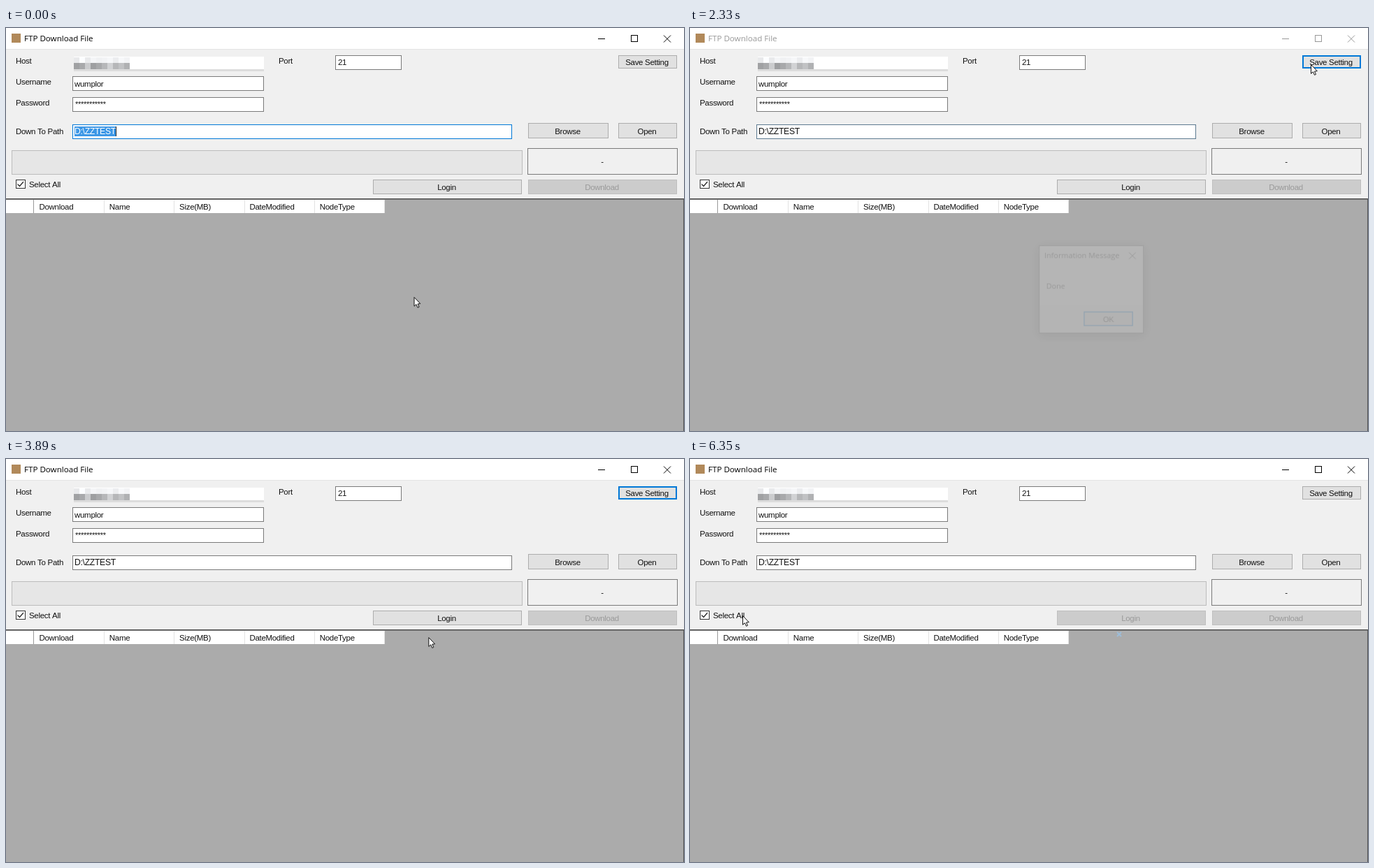
Write an HTML page with a canvas that moves like this. It is 970 px wide and 577 px high and loops after 8000 ms.

```html
<!DOCTYPE html>
<html lang="en">
<head>
<meta charset="utf-8">
<title>FTP Download File</title>
<style>
html, body { margin: 0; width: 100%; height: 100%; overflow: hidden; background: #ababab; }
canvas { display: block; }
</style>
</head>
<body>
<canvas id="stage" width="970" height="577"></canvas>
<script>
const stage = document.getElementById('stage').getContext('2d');
const layer = document.createElement('canvas').getContext('2d');
layer.canvas.width = 970;
layer.canvas.height = 577;
let ctx = stage;

const LOOP = 8000;
const SANS = '"Liberation Sans", Arial, sans-serif';
const UI = '"Open Sans", "Noto Sans", sans-serif';
const BLUE = '#0078d7';
const EDGE = '#7a7a7a';

// Pointer moves between rests
const START = { x: 583.5, y: 385 };
const MOVES = [
  { from: 780, to: 1220, x: 756, y: 95 },
  { from: 1350, to: 1550, x: 757, y: 82 },
  { from: 1650, to: 1990, x: 888, y: 52 },
  { from: 2390, to: 3200, x: 583.5, y: 412 },
  { from: 3690, to: 4080, x: 607, y: 235 },
  { from: 4800, to: 5400, x: 146, y: 234 },
  { from: 5740, to: 6350, x: 75, y: 224 }
];
const SAVE_CLICK = 2040, OK_CLICK = 3330, LOGIN_CLICK = 4160;

const ramp = (t, a, b) => Math.max(0, Math.min(1, (t - a) / (b - a)));
const within = (t, a, b) => t >= a && t < b;
const easeOut = k => 1 - (1 - k) ** 3;
const mix = (a, b, k) => a + (b - a) * k;

function pointerAt(t) {
  return MOVES.reduce((p, m) => {
    const k = easeOut(ramp(t, m.from, m.to));
    return { x: mix(p.x, m.x, k), y: mix(p.y, m.y, k) };
  }, START);
}

function fill(x, y, w, h, color) {
  ctx.fillStyle = color;
  ctx.fillRect(x, y, w, h);
}

// Filled box with its border drawn inside
function box(x, y, w, h, color, border, line = 1) {
  fill(x, y, w, h, color);
  ctx.strokeStyle = border;
  ctx.lineWidth = line;
  ctx.strokeRect(x + line / 2, y + line / 2, w - line, h - line);
}

function text(str, x, y, { color = '#111', size = 11.5, font = SANS, align = 'left' } = {}) {
  ctx.font = `${size}px ${font}`;
  ctx.letterSpacing = font === SANS ? '-0.3px' : '0px';
  ctx.textAlign = align;
  ctx.fillStyle = color;
  ctx.fillText(str, x, y);
}

function stroke(points, color, line = 1) {
  ctx.beginPath();
  points.forEach(([x, y]) => ctx.lineTo(x, y));
  ctx.strokeStyle = color;
  ctx.lineWidth = line;
  ctx.stroke();
}

function cross(x, y, size, color, line) {
  stroke([[x, y], [x + size, y + size]], color, line);
  stroke([[x + size, y], [x, y + size]], color, line);
}

const STATES = {
  normal: ['#e1e1e1', '#adadad', 1],
  focus: ['#e1e1e1', BLUE, 2],
  hover: ['#e5f1fb', BLUE, 1],
  pressed: ['#cce4f7', '#005499', 1],
  off: ['#cccccc', '#bfbfbf', 1]
};

function button(label, x, y, w, h, state = 'normal') {
  box(x, y, w, h, ...STATES[state]);
  text(label, x + w / 2 - 1, y + h / 2 + 4.5, { align: 'center', color: state === 'off' ? '#9a9a9a' : '#111' });
}

function titleBar(active) {
  const color = active ? '#000' : '#999';
  fill(0, 0, 970, 30, '#fff');
  fill(0, 30, 970, 1, '#e4e4e4');
  fill(8, 8, 13, 13, '#b1895a');
  text('FTP Download File', 26, 19, { color, size: 11.6, font: UI });
  stroke([[847, 15.5], [857, 15.5]], color);
  ctx.strokeRect(894.5, 10.5, 9, 9);
  cross(941, 10.5, 10, color);
}

// Blurred-out host: white field, soft lower edge, two rows of grey blocks
function hiddenHost() {
  fill(97, 41, 272, 18, '#fff');
  fill(97, 59, 272, 3, '#dcdcdc');
  for (let i = 0; i < 20; i++) {
    const noise = Math.abs(Math.sin(i * 12.9898) * 43758.5453) % 1;
    const v = i < 10 ? 232 + 22 * noise : 158 + 55 * noise;
    fill(97 + i % 10 * 8, i < 10 ? 42 : 50, 8, 9, `rgb(${v},${v + 1},${v + 3})`);
  }
}

function pathField(t) {
  const focused = t < SAVE_CLICK;
  const k = ramp(t, SAVE_CLICK, 2420);
  const border = `rgb(${122 * k},${mix(120, 122, k)},${mix(215, 122, k)})`;
  box(95, 138, 629, 21, '#fff', border);
  if (focused) fill(98, 141, 60, 14, '#3c97e6');
  text('D:\\ZZTEST', 98, 152, { size: 12.2, color: focused ? '#fff' : '#111' });
  const caretOn = (t + 50) % 1060 < 530;
  if (focused && caretOn) fill(157, 141, 1, 14, '#222');
}

function saveState(t) {
  if (t < 1930 || t >= LOGIN_CLICK) return 'normal';
  if (t < SAVE_CLICK) return 'hover';
  return t < 2200 ? 'pressed' : 'focus';
}

function loginState(t) {
  if (t < 4040) return 'normal';
  if (t < LOGIN_CLICK) return 'hover';
  return t < 4340 ? 'pressed' : 'off';
}

function form(t) {
  fill(0, 0, 970, 577, '#f0f0f0');
  titleBar(!within(t, 2260, 3540));

  ['Host', 'Username', 'Password'].forEach((label, i) => text(label, 14, 51 + 30 * i));
  text('Port', 390, 51);
  text('Down To Path', 14, 152);
  text('Select All', 33, 228);

  hiddenHost();
  box(95, 69, 274, 21, '#fff', EDGE);
  text('wumplor', 98, 84);
  box(95, 99, 274, 21, '#fff', EDGE);
  text('*'.repeat(11), 99, 113, { size: 11 });
  box(471, 39, 95, 21, '#fff', EDGE);
  text('21', 475, 53);
  pathField(t);

  button('Save Setting', 876, 39, 84, 19, saveState(t));
  button('Browse', 747, 136, 115, 22);
  button('Open', 876, 136, 84, 22);
  button('Login', 525, 217, 213, 21, loginState(t));
  button('Download', 747, 217, 213, 21, 'off');

  box(8, 175, 731, 35, '#e6e6e6', '#bcbcbc');
  box(746, 172, 215, 38, '#f0f0f0', EDGE);
  text('-', 853, 195, { align: 'center' });

  box(14, 217, 14, 13, '#fff', '#333');
  stroke([[16.5, 223.5], [19.5, 226.5], [25, 220]], '#222', 1.2);
}

function grid(t) {
  fill(0, 244, 970, 333, '#ababab');
  fill(0, 244, 970, 1.5, '#4c4c4c');
  fill(969, 244, 1, 333, '#555');
  fill(0, 246, 542, 19, '#fff');
  ['Download', 'Name', 'Size(MB)', 'DateModified', 'NodeType'].forEach((label, i) => {
    const x = 40 + 100.3 * i;
    text(label, x + 7.5, 260);
    fill(Math.round(x + 100), 246, 1, 19, '#e2e2e2');
  });
  fill(39, 246, 1, 19, '#999');
  if (t >= 4370) cross(611, 248, 6, '#9dbdd8', 2);
}

function dialogBody(t) {
  ctx.shadowColor = 'rgba(0,0,0,.45)';
  ctx.shadowBlur = 14;
  ctx.shadowOffsetY = 3;
  fill(497, 310, 157, 132, '#fff');
  ctx.shadowColor = 'transparent';
  box(497, 310, 157, 132, '#fff', '#555');
  fill(498, 400, 155, 41, '#f0f0f0');
  text('Information Message', 505, 329, { size: 11.4, font: UI });
  cross(632, 320.5, 10, '#111');
  text('Done', 508, 375, { size: 11.2, font: UI });
  box(564, 409, 74, 22, t >= 2900 ? '#dceaf6' : '#e1e1e1', BLUE, 1.5);
  text('OK', 601, 424.5, { align: 'center' });
}

// Composed on its own layer so that the whole dialog fades as one
function dialog(t) {
  const show = t < OK_CLICK
    ? 0.12 * ramp(t, 2260, 2330) + 0.88 * ramp(t, 2335, 2530)
    : 1 - ramp(t, 3470, 3610);
  if (show <= 0) return;
  ctx = layer;
  ctx.clearRect(0, 0, 970, 577);
  dialogBody(t);
  ctx = stage;

  const scale = mix(0.948, 1, show);
  ctx.save();
  ctx.globalAlpha = show;
  ctx.translate(mix(574, 575.5, show), mix(374, 376, show));
  ctx.scale(scale, scale);
  ctx.drawImage(layer.canvas, -575.5, -376);
  ctx.restore();
}

function pointer(t) {
  const { x, y } = pointerAt(t);
  ctx.save();
  ctx.translate(x, y);
  if ([SAVE_CLICK, OK_CLICK, LOGIN_CLICK].some(c => within(t, c, c + 170))) {
    ctx.beginPath();
    ctx.arc(0, 0, 12, 0, 7);
    ctx.fillStyle = 'rgba(248,240,40,.62)';
    ctx.fill();
  }
  const arrow = new Path2D('M.5 .5V13.3L3.4 10.7 5.5 15.3 7.5 14.4 5.5 10 9.3 9.7Z');
  ctx.fillStyle = '#fff';
  ctx.fill(arrow);
  ctx.strokeStyle = '#111';
  ctx.lineWidth = 1;
  ctx.stroke(arrow);
  ctx.restore();
}

function draw(now) {
  const t = now % LOOP;
  form(t);
  grid(t);
  dialog(t);
  pointer(t);
  requestAnimationFrame(draw);
}
requestAnimationFrame(draw);
</script>
</body>
</html>
```
